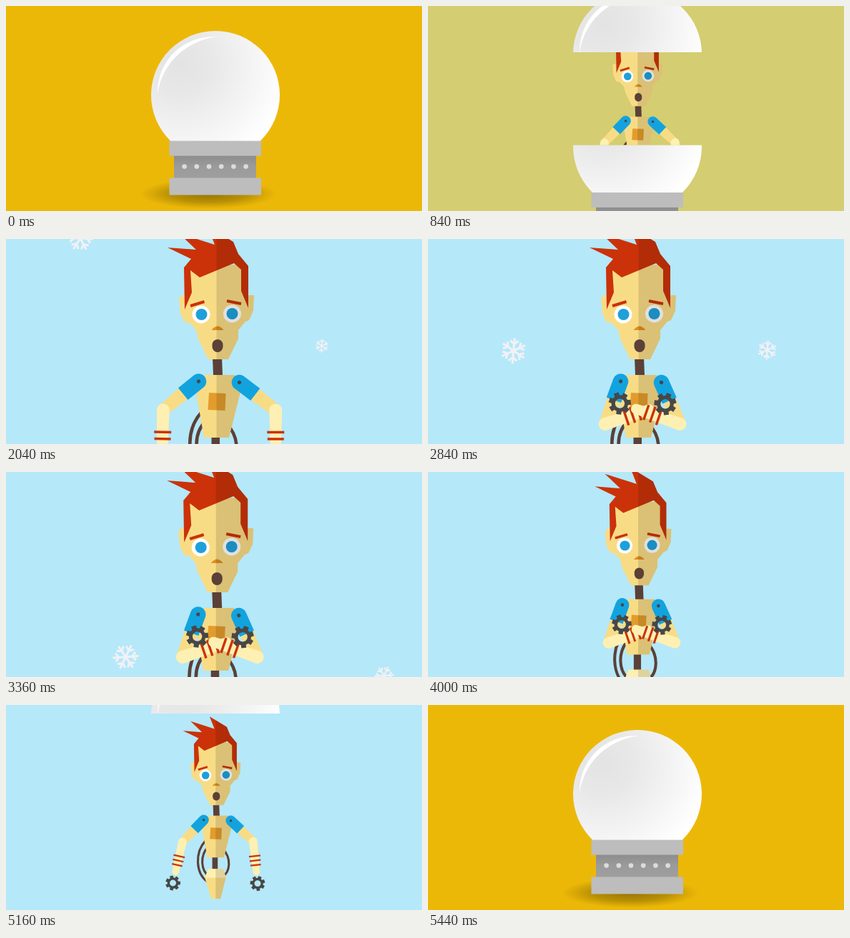
An HTML page for the animation above (5760 ms loop, 582 by 288 pixels).

```html
<!DOCTYPE html>
<html lang="en">
<head>
<meta charset="utf-8">
<title>Snow globe robot</title>
<style>
  html, body { margin: 0; width: 100%; height: 100%; overflow: hidden; }
  svg { display: block; width: 582px; height: 288px; }
</style>
</head>
<body>
<svg id="stage" viewBox="0 0 582 288">
  <defs>
    <radialGradient id="glass" gradientUnits="userSpaceOnUse" cx="244" cy="82" r="150">
      <stop offset="0" stop-color="#e3e3e3"/>
      <stop offset=".3" stop-color="#e8e8e8"/>
      <stop offset=".7" stop-color="#f5f5f5"/>
      <stop offset="1" stop-color="#ffffff"/>
    </radialGradient>
    <radialGradient id="ground">
      <stop offset="0" stop-color="#5f4a00" stop-opacity=".62"/>
      <stop offset=".55" stop-color="#6b5300" stop-opacity=".4"/>
      <stop offset="1" stop-color="#7a5f00" stop-opacity="0"/>
    </radialGradient>
    <linearGradient id="under" x1="0" y1="0" x2="0" y2="1">
      <stop offset="0" stop-color="#8b8b8b"/>
      <stop offset=".5" stop-color="#9b9b9b"/>
      <stop offset="1" stop-color="#9f9f9f"/>
    </linearGradient>
    <path id="face" d="M254 45L251 90L256 117L266 128L269 141L283 169H311L325 140V128L334 117L338 95L332 35L272 40Z"/>
    <path id="earL" d="M242 82L250 78L257 118L250 117L244 105Z"/>
    <path id="earR" d="M338 79H347L346 101L340 114L333 117Z"/>
    <path id="hair" d="M226 12L266 15L242 -8L292 8L282 -18L318 4L325 21L339 38V97L329 73V43L319 34L271 54L258 44L260 75L250 99L249 40L259 28Z"/>
    <path id="torso" d="M275 191H320L328 215L312 279H277L266 215Z"/>
    <path id="hip" d="M279 303H311L316 322L305 366H285L272 322Z"/>
    <clipPath id="bodyClip">
      <use href="#face"/><use href="#earR"/><use href="#hair"/><use href="#torso"/><use href="#hip"/>
    </clipPath>
    <clipPath id="topClip"><rect x="200" y="30" width="186" height="93"/></clipPath>
    <clipPath id="lowClip"><rect x="200" y="123" width="186" height="95"/></clipPath>
    <clipPath id="gapClip"><rect id="gap" width="582"/></clipPath>
    <g id="ball">
      <circle cx="293" cy="125" r="90" fill="url(#glass)"/>
      <path d="M212 123C212 76 247 42 295 43C250 50 219 80 212 123Z" fill="#fff"/>
    </g>
    <g id="upper">
      <path d="M20 -10L64 -8.5V8.5L20 10Z" fill="#f8dc85"/>
      <path d="M28 -10.8H0A10.8 10.8 0 0 0 0 10.8H28Z" fill="#12a3df"/>
      <circle r="2.6" fill="#44474c"/>
    </g>
    <g id="fore">
      <path d="M0 -9A9 9 0 0 0 0 9L66 7Q72 6 72 0T66 -7Z" fill="#fdf0b2"/>
      <path d="M31 -12V12M40.5 -11.5V11.5M50 -11V11" stroke="#cb3209" stroke-width="3.4"/>
    </g>
    <g id="gear" stroke="#474747" fill="none">
      <circle r="9.2" stroke-width="5"/>
      <path id="teeth" stroke-width="7"/>
    </g>
    <path id="flake" fill="none" stroke="#f1f1f5" stroke-width=".17"/>
  </defs>

  <rect id="sky" width="582" height="288"/>
  <g id="snow"></g>

  <g clip-path="url(#gapClip)">
    <g id="robot">
      <g fill="none" stroke="#5b4037" stroke-width="4.6">
        <path d="M273 244C251 268 252 312 277 330"/>
        <path d="M279 256C262 274 262 306 282 320"/>
        <path d="M309 260C328 280 326 310 308 320"/>
      </g>
      <rect x="287.5" y="276" width="11.5" height="30" fill="#5b4037"/>
      <use href="#hip" fill="#f8dc85"/>
      <path d="M279 303H311L316 322H272Z" fill="#fdf0b2"/>
      <path d="M289 166H302L303 192H290Z" fill="#5b4037"/>
      <g fill="#f8dc85">
        <use href="#torso"/><use href="#earL"/><use href="#earR"/><use href="#face"/>
      </g>
      <path d="M284 216L307.500 217L306.500 241L282.500 240Z" fill="#e39c2c"/>
      <use href="#hair" fill="#cb3209"/>
      <g fill="#fff"><circle cx="273" cy="106" r="12.500"/><circle cx="316.500" cy="105" r="12.500"/></g>
      <g fill="#1fa0d9"><circle cx="273.500" cy="106" r="8"/><circle cx="316.500" cy="105" r="8"/></g>
      <path d="M258 94L277.500 88M309 87L329 91" stroke="#cb3209" stroke-width="4"/>
      <path d="M287.500 128Q296 117 304.500 128Z" fill="#e08f1f"/>
      <rect x="294.500" y="-20" width="60" height="390" opacity=".12" clip-path="url(#bodyClip)"/>
      <rect x="288.500" y="141" width="15" height="18" rx="7.500" fill="#5b4037"/>
      <g id="arms"></g>
    </g>
  </g>

  <g id="low">
    <ellipse cx="283" cy="264" rx="96" ry="21" fill="url(#ground)"/>
    <g clip-path="url(#lowClip)"><use href="#ball"/></g>
    <rect x="235" y="208" width="115" height="36" fill="url(#under)"/>
    <g fill="#bdbdbd">
      <rect x="228.500" y="189.500" width="128.500" height="21"/>
      <rect x="228.500" y="241.500" width="128.500" height="24"/>
    </g>
    <g id="studs" fill="#dcdcdc"></g>
  </g>
  <g id="top"><g clip-path="url(#topClip)"><use href="#ball"/></g></g>
</svg>

<script>
const LOOP = 5760, STEP = 40, SEAM = 123, LIFT = 133, DROP = 166.5;
const UPPER = 64, REACH = 89, TEETH = 7;
const GOLD = [236, 184, 8], ICE = [181, 232, 249];

const $ = id => document.getElementById(id);
const set = (el, name, value) => el.setAttribute(name, value);
const move = (el, value) => set(el, 'transform', value);
const mix = (a, b, p) => a + (b - a) * p;
const ramp = (t, a, b) => Math.min(1, Math.max(0, (t - a) / (b - a)));
const inOut = p => p < .5 ? 2 * p * p : 1 - 2 * (1 - p) * (1 - p);
const sway = p => (1 - Math.cos(Math.PI * p)) / 2;
const settle = p => 1 - Math.pow(1 - p, 1.35);

function add(parent, tag, attrs = {}) {
  const el = document.createElementNS('http://www.w3.org/2000/svg', tag);
  for (const name in attrs) set(el, name, attrs[name]);
  return parent.appendChild(el);
}

// Points on a circle, joined into repeated strokes
const polar = (r, deg) => {
  const a = deg * Math.PI / 180;
  return (r * Math.cos(a)).toFixed(3) + ' ' + (r * Math.sin(a)).toFixed(3);
};

let teeth = '', crystal = '';
for (let i = 0; i < TEETH; i++) {
  const a = i * 360 / TEETH;
  teeth += `M${polar(10, a)}L${polar(15.5, a)}`;
}
for (let i = 0; i < 6; i++) {
  const a = i * 60;
  crystal += `M0 0L${polar(1, a)}M${polar(.85, a - 22)}L${polar(.52, a)}L${polar(.85, a + 22)}`;
}
set($('teeth'), 'd', teeth);
set($('flake'), 'd', crystal);

for (let i = 0; i < 6; i++) add($('studs'), 'circle', { cx: 249.6 + i * 17.2, cy: 225.6, r: 3.3 });

// Each flake passes height y at time t with its own fall speed
const flakes = [
  { x: 92.5, y: 157, t: 2840, speed: .1975, r: 18, turn: 35 },
  { x: 418, y: 150, t: 2040, speed: .33, r: 9.5, turn: 35 },
  { x: 448, y: 156, t: 2840, speed: .25, r: 13.5, turn: 35 }
];
for (const f of flakes) f.el = add($('snow'), 'use', { href: '#flake' });

// Angles in degrees: resting, flinching, folded
const arms = [
  { x: 269.5, y: 200, side: 1, up: [134, 141, 110], fore: [103, 91, -18.6] },
  { x: 326.5, y: 201.5, side: -1, up: [137, 142.5, 114], fore: [96, 90, -19] }
];
for (const arm of arms) {
  const g = add($('arms'), 'g');
  move(g, `translate(${arm.x} ${arm.y}) scale(${arm.side} 1)`);
  arm.upper = add(g, 'use', { href: '#upper' });
  arm.lower = add(g, 'use', { href: '#fore' });
}
for (const arm of arms) {
  const g = add($('arms'), 'g');
  move(g, `translate(${arm.x} ${arm.y}) scale(${arm.side} 1)`);
  arm.gear = add(g, 'use', { href: '#gear' });
}

function pose([rest, flinch, fold], t) {
  if (t >= 4120) return mix(fold, rest, inOut(ramp(t, 4120, 4400)));
  if (t >= 2040) return mix(flinch, fold, inOut(ramp(t, 2040, 2360)));
  return mix(rest, flinch, ramp(t, 1960, 2040));
}

function drawGlobe(t) {
  const open = inOut(ramp(t, 560, 1160));
  const closing = t >= 5160;
  const lift = closing ? 1 - settle(ramp(t, 5120, 5440)) : open;
  const drop = closing ? 1 - settle(ramp(t, 5160, 5440)) : open;
  const up = -LIFT * lift, down = DROP * drop;
  move($('top'), `translate(0 ${up})`);
  move($('low'), `translate(0 ${down})`);
  set($('gap'), 'y', SEAM + up);
  set($('gap'), 'height', down - up);
  set($('sky'), 'fill', `rgb(${GOLD.map((c, i) => Math.round(mix(c, ICE[i], drop)))})`);
}

function drawSnow(t) {
  for (const f of flakes) {
    const y = f.y + f.speed * (t - f.t);
    const x = f.x + 83 * sway((y - 60) / 250);
    const turn = f.turn + (t - f.t) * .04;
    set(f.el, 'visibility', y > -30 && y < 318 ? 'visible' : 'hidden');
    move(f.el, `translate(${x} ${y}) rotate(${turn}) scale(${f.r})`);
  }
}

function drawRobot(t) {
  const far = 1 - sway(ramp(t, 1160, 1360)) + sway(ramp(t, 3920, 4120));
  const cold = t >= 2600 && t < 3920 ? .8 * Math.sin((t - 2600) / 80 * Math.PI) : 0;
  move($('robot'), `translate(${96.9 * far + cold} ${28.2 * far}) scale(${1 - far / 3})`);
  for (const arm of arms) {
    const up = pose(arm.up, t), fore = pose(arm.fore, t);
    const elbow = `rotate(${up}) translate(${UPPER} 0) rotate(${fore - up})`;
    move(arm.upper, `rotate(${up})`);
    move(arm.lower, elbow);
    move(arm.gear, `${elbow} translate(${REACH} 0)`);
  }
}

function draw(now) {
  const t = Math.floor(now % LOOP / STEP) * STEP;
  drawGlobe(t);
  drawSnow(t);
  drawRobot(t);
}

function tick(now) {
  draw(now);
  requestAnimationFrame(tick);
}
draw(0);
requestAnimationFrame(tick);
</script>
</body>
</html>
```
